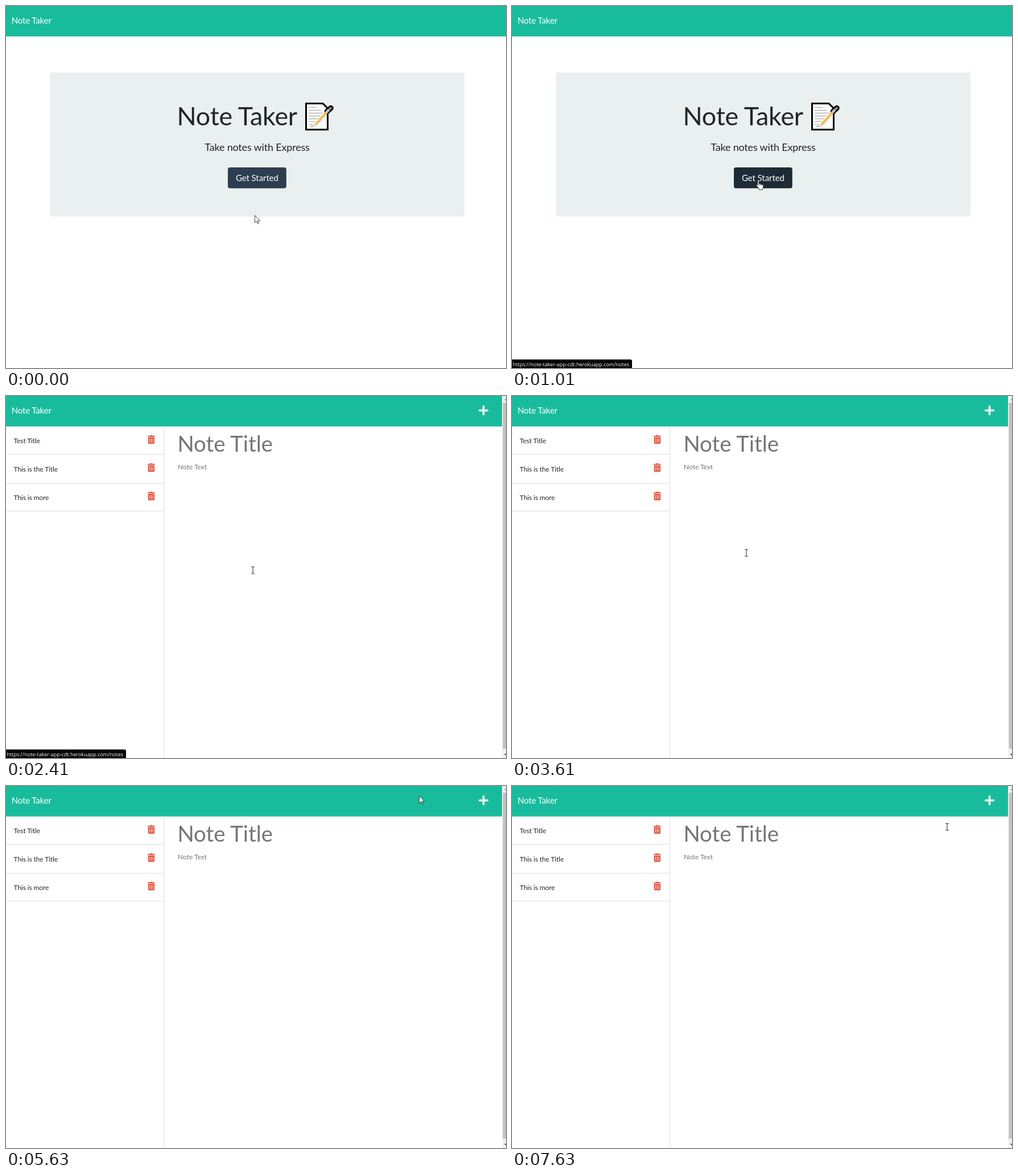
An HTML page that plays this animation: 879x637 px, repeating every 8 s.

```html
<!DOCTYPE html>
<html lang="en">
<head>
<meta charset="utf-8">
<title>Note Taker</title>
<style>
  html, body { margin: 0; width: 100%; height: 100%; overflow: hidden; background: #fff; }
  svg { display: block; }
  text { font-family: Lato, sans-serif; font-size: 12px; letter-spacing: -.01em; fill: #212529; white-space: pre; }
  .mid { text-anchor: middle; }
  .brand, .label { font-size: 15px; fill: #fff; }
  .label { letter-spacing: -.004em; }
  .title { font-size: 44.8px; letter-spacing: -.004em; }
  .lead { font-size: 18px; }
  .hint { fill: #757575; letter-spacing: 0; }
  .big { font-size: 38.4px; }
  .url { font-family: "Open Sans", "Noto Sans", sans-serif; font-size: 9px; letter-spacing: 0; fill: #fff; }
  .rule { stroke: #dfdfdf; }
  .shape { fill: #fff; stroke: #000; stroke-linejoin: round; }

  /* 1% = 80 ms; everything changes in hard steps */
  .anim { animation: 8s step-end infinite; }
  #home { animation-name: home; }
  #notes { animation-name: notes; }
  #button { animation-name: hover; }
  #ring { animation-name: ring; }
  #status { animation-name: status; }
  #cursor { animation-name: move; }
  #arrow { animation-name: arrow; }
  #hand { animation-name: hand; }
  #beam { animation-name: beam; }

  @keyframes home { 0% { opacity: 1; } 30.125%, 100% { opacity: 0; } }
  @keyframes notes { 0% { opacity: 0; } 30.125%, 100% { opacity: 1; } }
  @keyframes hover { 0% { fill: #2c3e50; } 10.125%, 100% { fill: #1e2b37; } }
  @keyframes ring { 0% { opacity: 0; } 22.625%, 100% { opacity: 1; } }
  @keyframes status { 0%, 32.625%, 100% { opacity: 0; } 12.625% { opacity: 1; } }

  @keyframes arrow {
    0%, 27.625%, 52.75%, 62.875%, 67.875%, 82.875% { opacity: 1; }
    10.125%, 30.125%, 55.375%, 65.375%, 77.875%, 95.375%, 100% { opacity: 0; }
  }
  @keyframes hand {
    0%, 27.625%, 62.875%, 82.875%, 100% { opacity: 0; }
    10.125%, 55.375%, 77.875% { opacity: 1; }
  }
  @keyframes beam {
    0%, 52.75%, 67.875% { opacity: 0; }
    30.125%, 65.375%, 95.375%, 100% { opacity: 1; }
  }
  @keyframes move {
    0% { transform: translate(437px, 368px); }
    5% { transform: translate(438px, 354px); }
    7.5% { transform: translate(431px, 327px); }
    10.125% { transform: translate(432px, 310px); }
    12.625% { transform: translate(433px, 306px); }
    30.125% { transform: translate(434px, 306.5px); }
    45.125% { transform: translate(412px, 276px); }
    47.625% { transform: translate(355px, 217px); }
    50.25% { transform: translate(300px, 166px); }
    52.75% { transform: translate(264px, 138px); }
    55.375% { transform: translate(254px, 126px); }
    57.875% { transform: translate(252.5px, 121.5px); }
    62.875% { transform: translate(243px, 118px); }
    65.375% { transform: translate(345px, 86px); }
    67.875% { transform: translate(550px, 38px); }
    70.375% { transform: translate(726px, 17px); }
    72.875% { transform: translate(810px, 20px); }
    75.375% { transform: translate(851px, 29px); }
    77.875% { transform: translate(843px, 26px); }
    80.375% { transform: translate(838px, 24px); }
    82.875% { transform: translate(812px, 22px); }
    85.375% { transform: translate(755px, 17px); }
    87.875% { transform: translate(690px, 10px); }
    90.375% { transform: translate(644px, 6px); }
    92.875% { transform: translate(705px, 32px); }
    95.375%, 100% { transform: translate(765px, 72px); }
  }
</style>
</head>
<body>
<svg width="879" height="637" viewBox="0 0 879 637">
  <defs>
    <path id="trash" fill="#e0503a" transform="scale(.0293)" d="M32 464a48 48 0 0 0 48 48h288a48 48 0 0 0 48-48V128H32zm272-256a16 16 0 0 1 32 0v224a16 16 0 0 1-32 0zm-96 0a16 16 0 0 1 32 0v224a16 16 0 0 1-32 0zm-96 0a16 16 0 0 1 32 0v224a16 16 0 0 1-32 0zM432 32H312l-9.4-18.7A24 24 0 0 0 281 0H167a24 24 0 0 0-21.5 13.3L136 32H16A16 16 0 0 0 0 48v32a16 16 0 0 0 16 16h416a16 16 0 0 0 16-16V48a16 16 0 0 0-16-16z"/>
  </defs>

  <rect width="879" height="637" fill="#fff"/>
  <rect width="879" height="53.6" fill="#18bc9c"/>
  <text class="brand" x="9.8" y="31">Note Taker</text>

  <g id="home" class="anim">
    <rect x="77" y="117" width="729" height="253.5" rx="3.8" fill="#eaf0f0"/>
    <text class="title" x="300.5" y="210">Note Taker</text>

    <!-- memo icon -->
    <path d="M527.5 171.5H557L565.5 180V217.5H527.5Z" fill="#fafafa" stroke="#000" stroke-width="3"/>
    <path d="M532 178.500h14M532 183.500h22M532 188.500h25M532 193.500h21M532 198.500h16M532 203.500h12M532 208.500h9" stroke="#a6a6a6" stroke-width="1.2"/>
    <path d="M564.5 185.5L571 179.500" stroke="#000" stroke-width="9.5" stroke-linecap="round"/>
    <path d="M567.5 182.700L571 179.500" stroke="#8a8a8a" stroke-width="4" stroke-linecap="round"/>
    <path d="M545 208L564.5 186" stroke="#efbd5c" stroke-width="4.6"/>
    <path d="M564 186.500L567.5 182.700" stroke="#c4c4c6" stroke-width="4.6"/>
    <path d="M540 212.500L543.2 206.400L546.8 209.700Z" fill="#e6cfa5"/>
    <path d="M535 212.500q3-2 5.5-.5" fill="none" stroke="#777"/>

    <text class="lead mid" x="441.5" y="255">Take notes with Express</text>
    <rect id="ring" class="anim" x="387.5" y="281.5" width="108" height="42" rx="6" fill="#9ca6ad"/>
    <rect id="button" class="anim" x="390" y="284" width="102.8" height="36.8" rx="3.8" fill="#2c3e50"/>
    <text class="label mid" x="441.4" y="308">Get Started</text>
  </g>

  <g id="notes" class="anim">
    <path class="rule" d="M0 102.500H277M0 153.500H277M0 202.500H276M277.500 54V637"/>
    <text x="13.6" y="83">Test Title</text>
    <text x="13.6" y="132.5">This is the Title</text>
    <text x="13.6" y="182.5">This is more</text>
    <use href="#trash" x="248.85" y="69"/>
    <use href="#trash" x="248.85" y="118.5"/>
    <use href="#trash" x="248.85" y="168.5"/>
    <text class="hint big" x="301.4" y="98">Note Title</text>
    <text class="hint" x="302" y="128.5">Note Text</text>
    <path d="M832.6 25.300H846.400M839.500 18.400V32.200" stroke="#ecf0f1" stroke-width="3.8" stroke-linecap="round"/>

    <!-- scrollbar -->
    <rect x="872" width="7" height="637" fill="#f1f1f1"/>
    <rect x="873.5" y="12" width="5.5" height="608.5" fill="#c1c1c1"/>
    <path d="M875.5 7.500L879 4V7.500Z" fill="#a3a3a8"/>
    <path d="M875.5 629.500H879V633Z" fill="#505050"/>
  </g>

  <g id="status" class="anim">
    <path d="M0 622H208a3 3 0 0 1 3 3V637H0Z" fill="#000"/>
    <text class="url" x="1.5" y="633.5">https://note-taker-app-cdt.herokuapp.com/notes</text>
  </g>

  <g id="cursor" class="anim">
    <g id="arrow" class="anim">
      <path class="shape" transform="translate(.4 .4) scale(.78)" d="M0 0V16.500L4 13L6.500 19L9 18L6.500 12.200H11.800Z"/>
    </g>
    <g id="hand" class="anim">
      <g transform="translate(-4 0) scale(.8)">
        <path class="shape" d="M5 .5q1.5 0 1.5 1.5v6q2.5-.5 3 1q2.3-.4 3 1q2.8-.4 3.5 1.5v4q0 2-1.5 3.500v2.500h-8v-2L2 14Q.5 12 .6 11q1-1.500 2.900 .8V2q0-1.500 1.500-1.500z"/>
        <path d="M6.500 8v4M9.500 9v3M12.500 10v2.500" stroke="#000" fill="none"/>
      </g>
    </g>
    <g id="beam" class="anim">
      <path d="M-3 -6H-.8L0 -5.500L.8 -6H3M0 -5.500V5.500M-3 6H-.8L0 5.500L.8 6H3" fill="none" stroke="#333" stroke-width="1.1"/>
    </g>
  </g>
</svg>
</body>
</html>
```
